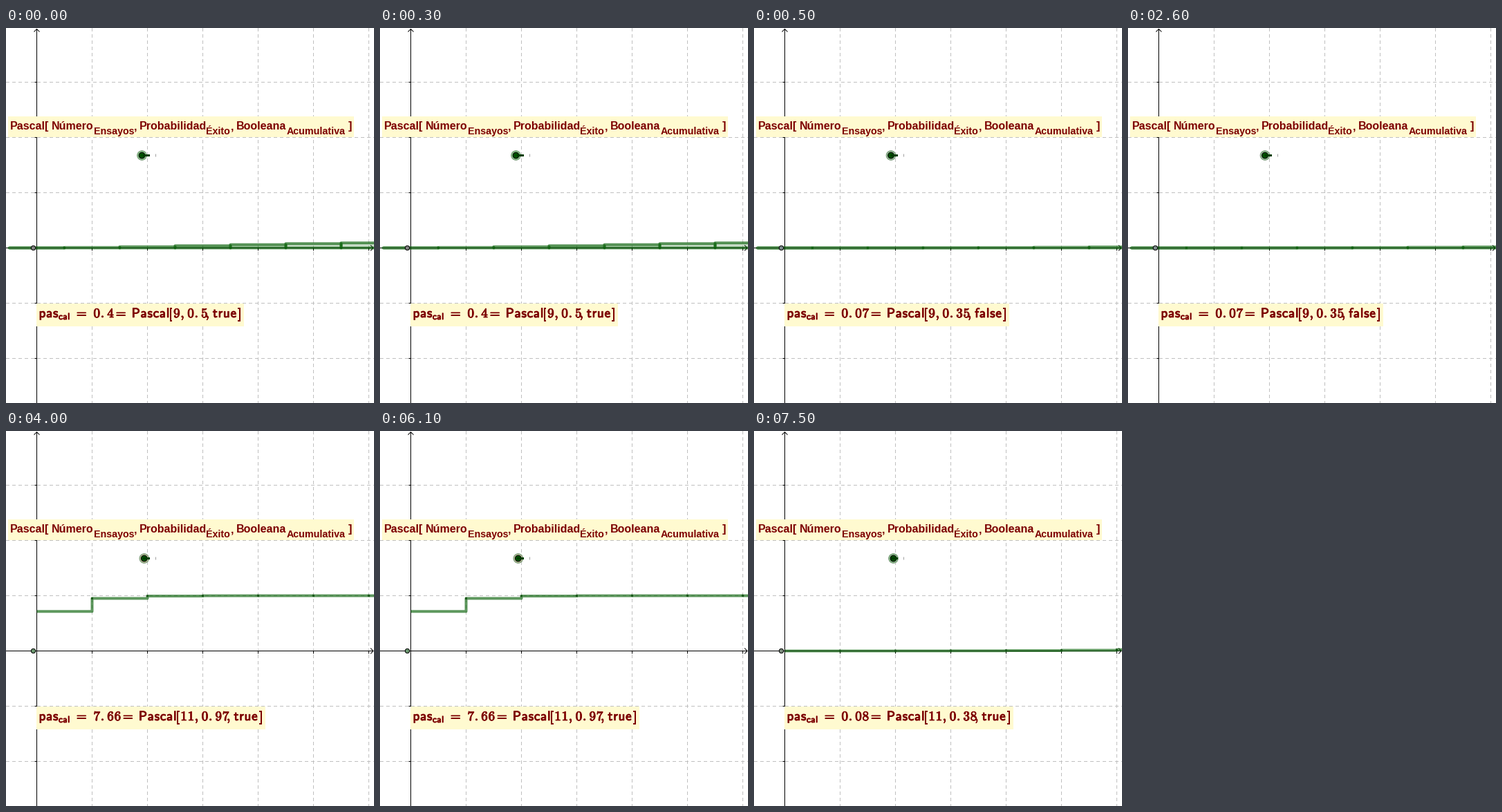
These frames come from a looping animation (532 px wide and 543 px high, 8 s). A matplotlib script:

```python
from math import comb

import matplotlib.pyplot as plt
from matplotlib import patheffects
from matplotlib.animation import FuncAnimation
from matplotlib.patches import Circle, Rectangle

W, H, DPI = 532, 543, 64
PX = 72 / DPI
UNIT = 80
OX, OY = 44.5, 318.5
STEP = 500

MAROON = "#7d0000"
CREAM = "#fffad0"
GREEN = (0, 0.36, 0)
ALPHA = 0.63

# duration in steps, shown value, trials, probability, cumulative word,
# bars or stairs, slider x, slider halo, origin point fill
STATES = [
    (1, "0.4", 9, "0.5", "true", "bars", 196.5, "#88c488", "#808080"),
    (7, "0.07", 9, "0.35", "false", "bars", 198, "#98bf98", "#7c8a8c"),
    (7, "7.66", 11, "0.97", "true", "stairs", 199.8, "#b2ba92", "#6a966e"),
    (1, "0.08", 11, "0.38", "true", "stairs", 201.5, "#88b888", "#7c8a7c"),
]
TIMELINE = [s for s in STATES for _ in range(s[0])]

plt.rcParams["path.snap"] = False
fig = plt.figure(figsize=(W / DPI, H / DPI), dpi=DPI, facecolor="white")
ax = fig.add_axes([0, 0, 1, 1])
ax.set_xlim(0, W)
ax.set_ylim(H, 0)
ax.axis("off")

moving = []


def line(xs, ys, width=1, color="black", z=2, **kw):
    kw.setdefault("solid_capstyle", "butt")
    return ax.plot(xs, ys, color=color, lw=width * PX, zorder=z, **kw)[0]


def box(x0, y0, x1, y1):
    return ax.add_patch(Rectangle((x0, y0), x1 - x0, y1 - y0, fc=CREAM,
                                  ec="none", zorder=6))


def dot(x, y, r, fill, edge="black", width=1, z=5):
    return ax.add_patch(Circle((x, y), r, fc=fill, ec=edge, lw=width * PX,
                               zorder=z))


def label(x, y, s, size):
    return ax.text(x, y, s, family="Liberation Sans", weight="bold",
                   size=size * PX, color=MAROON, zorder=7)


def formula(x, s, y=419, size=19):
    """Bold sans math: outlined glyphs, tracked to make room for the outline."""
    bold = patheffects.withStroke(linewidth=PX, foreground=MAROON)
    tracked = r"\hspace{0.05}".join(s)
    return ax.text(x, y, rf"$\mathsf{{{tracked}}}$", math_fontfamily="cm",
                   size=size * PX, color=MAROON, zorder=7,
                   path_effects=[bold])


def number_width(s):
    return sum(5.7 if c == "." else 10.2 for c in s)


def pmf(k, n, p):
    return comb(n + k - 1, k) * p ** n * (1 - p) ** k


def draw_static():
    dash = dict(color="#c0c0c0", z=1, ls=(0, (5, 4)), dash_capstyle="butt")
    for k in range(-2, 7):
        x, y = OX + k * UNIT, OY - k * UNIT
        if k > 0:
            line([x, x], [0, H], **dash)
            line([x, x], [OY, OY + 4])
        if k and k < 4:
            line([0, W], [y, y], **dash)
            line([OX - 3, OX], [y, y])
    line([OX, OX], [1.5, H])
    line([0, W - 1], [OY, OY])
    line([OX - 4, OX, OX + 4], [5.5, 1.5, 5.5])
    line([W - 5, W - 1, W - 5], [OY - 4, OY, OY + 4])

    box(3, 128, 503, 158)
    for x, s in [(6, "Pascal["), (66, "Número"), (185, ","),
                 (193, "Probabilidad"), (325, ","), (333, "Booleana"),
                 (495, "]")]:
        label(x, 147, s, 16)
    for x, s in [(126.5, "Ensayos"), (289.5, "Éxito"), (406, "Acumulativa")]:
        label(x, 154, s, 14.2)

    formula(47.5, "pas")
    formula(76, "cal", 422, 13)
    formula(98.5, "=")
    line([198, 208], [184.5, 184.5], 3, "#003c00", 5.5)
    line([216.5, 216.5], [182.5, 186.5], 1, "#a0a0a0", 4)


def draw_bars(n, p):
    for k in range(7):
        h = UNIT * pmf(k, n, p)
        x = OX + (k - 0.5) * UNIT
        moving.append(ax.add_patch(Rectangle(
            (x, OY - h), UNIT, h, fc=(*GREEN, 0.2), ec=(*GREEN, ALPHA),
            lw=4 * PX, joinstyle="round", zorder=3)))


def draw_stairs(n, p):
    xs, ys, total = [], [], 0
    for k in range(7):
        total += pmf(k, n, p)
        x, y = OX + k * UNIT, OY - UNIT * total
        xs += [x, x + UNIT]
        ys += [y, y]
        if k:
            moving.append(line([x - 1.5, x + 1.5], [y, y], 3, "#1c5a1c", 4))
    moving.append(line(xs, ys, 4, GREEN, 3, alpha=ALPHA,
                       solid_joinstyle="round"))


def draw_formula(value, n, p, word):
    eq = 127 + number_width(value) + 2.3
    name = eq + 26.2
    count = name + 60.5
    comma1 = count + number_width(n)
    prob = comma1 + 10
    comma2 = prob + number_width(p)
    flag = comma2 + 10.5
    close = flag + (36 if word == "true" else 40.5)
    for x, s in [(126.5, value), (eq, "="), (name, "Pascal"),
                 (name + 53, "["), (count, n), (comma1, ","), (prob, p),
                 (comma2, ","), (flag, word), (close, "]")]:
        moving.append(formula(x, s))
    moving.append(box(44, 399, round(close + 9.5), 432))


def reset():
    while moving:
        moving.pop().remove()


def update(i):
    reset()
    _, value, n, p, word, kind, x, halo, fill = TIMELINE[i]
    (draw_bars if kind == "bars" else draw_stairs)(n, float(p))
    draw_formula(value, str(n), p, word)
    moving.append(dot(x, 184.5, 6.8, halo, "#7a9a7a"))
    moving.append(dot(x, 184.5, 4.3, "#005000"))
    moving.append(dot(39.5, OY, 3.2, fill))
    return moving


draw_static()
anim = FuncAnimation(fig, update, frames=len(TIMELINE), init_func=reset,
                     interval=STEP, repeat=True, repeat_delay=0, blit=False)
plt.show()
```
